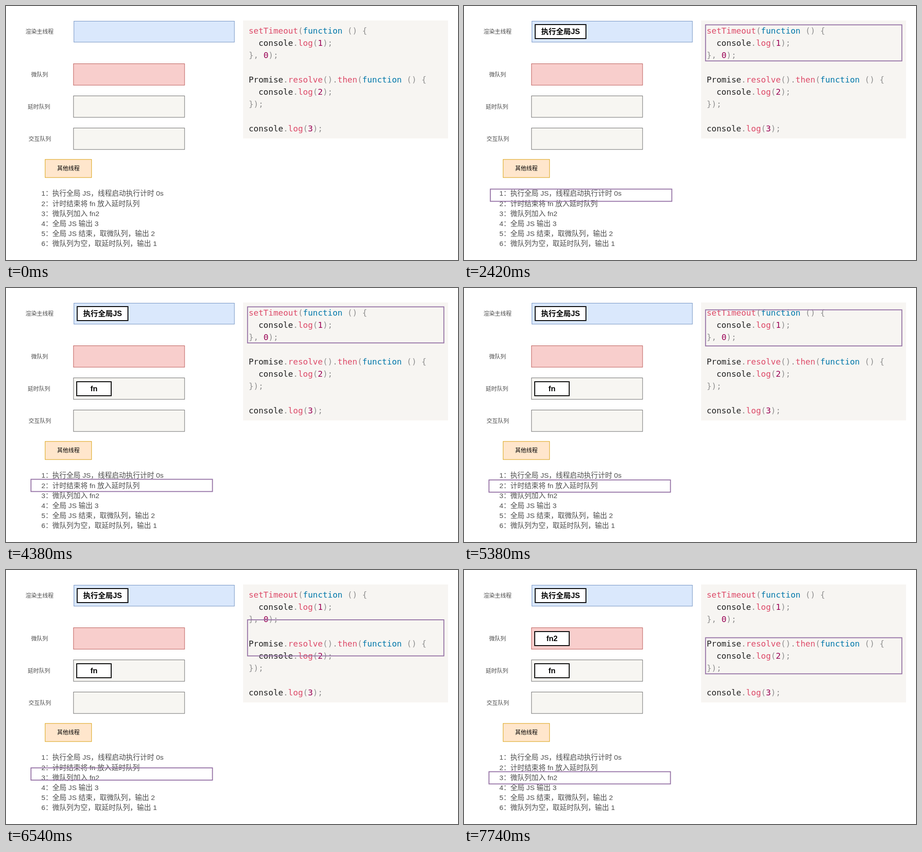
An HTML page that plays this animation: 997 px wide and 561 px high, repeating every 8 s.

```html
<!DOCTYPE html>
<html lang="zh-CN">
<head>
<meta charset="utf-8">
<title>Event loop</title>
<style>
  html, body { margin: 0; width: 100%; height: 100%; overflow: hidden; background: #fff; }
  svg { display: block; width: 997px; height: 561px; }
  text { font-family: "Liberation Sans", "Noto Sans CJK SC", "Noto Sans CJK", sans-serif; white-space: pre; }
  .label { font-size: 12.4px; fill: #4c4c4c; text-anchor: middle; }
  .step { font-size: 15.55px; fill: #4c4c4c; }
  .task { font-size: 16.4px; font-weight: bold; text-anchor: middle; }
  .code { font: 18.1px "DejaVu Sans Mono", monospace; fill: #222; }
  .call { fill: #dd4a68; }
  .key { fill: #0077aa; }
  .num { fill: #990055; }
  .punct { fill: #919191; }
</style>
</head>
<body>
<svg id="stage" viewBox="0 0 997 561"></svg>
<script>
const LOOP = 8000;
const stage = document.getElementById('stage');

const rect = (x, y, w, h, fill, stroke = 'none', width = 1, id = '') =>
  `<rect${id && ` id="${id}"`} x="${x}" y="${y}" width="${w}" height="${h}" fill="${fill}" stroke="${stroke}" stroke-width="${width}"/>`;
const text = (x, y, cls, body, fill = '') =>
  `<text x="${x}" y="${y}" class="${cls}"${fill && ` style="fill:${fill}"`}>${body}</text>`;
const queue = (y, fill, stroke) => rect(148.9, y, 245, 47.4, fill, stroke);
const task = (id, x, y, w, h, name) =>
  `<g id="${id}" opacity="0">${rect(x, y, w, h, '#fff', '#000', 2)}${text(x + w / 2, y + h / 2 + 5.7, 'task', name)}</g>`;
const marker = (id, w, h) => rect(0, 0, w, h, 'none', '#9673a6', 2, id);

const highlight = line => line.replace(
  /(\bfunction\b)|(\w+)(?=\()|(\b\d+\b)|([.(){},;]+)/g,
  (m, key, call, num) => `<tspan class="${key ? 'key' : call ? 'call' : num ? 'num' : 'punct'}">${m}</tspan>`);

const code = `setTimeout(function () {
  console.log(1);
}, 0);

Promise.resolve().then(function () {
  console.log(2);
});

console.log(3);`.split('\n');

const steps = [
  '执行全局 JS，线程启动执行计时 0s',
  '计时结束将 fn 放入延时队列',
  '微队列加入 fn2',
  '全局 JS 输出 3',
  '全局 JS 结束，取微队列，输出 2',
  '微队列为空，取延时队列，输出 1'
];

stage.innerHTML = [
  rect(149.8, 33.5, 354, 46.3, '#dae8fc', '#6c8ebf'),
  queue(127.5, '#f8cecc', '#b85450'),
  queue(198.5, '#f7f6f2', '#666'),
  queue(269.5, '#f7f6f2', '#666'),
  rect(86.3, 338.9, 102.4, 40, '#ffe6cc', '#d79b00'),
  text(74, 61, 'label', '渲染主线程'),
  text(74, 156, 'label', '微队列'),
  text(72.7, 227, 'label', '延时队列'),
  text(74.5, 298, 'label', '交互队列'),
  text(137.5, 363, 'label', '其他线程', '#000'),
  ...steps.map((s, i) => text(78, 419.3 + i * 22.2, 'step', `${i + 1}：${s}`)),
  rect(523, 32, 452, 260.5, '#f7f5f2'),
  ...code.map((line, i) => text(535.2, 61 + i * 27.05, 'code', highlight(line))),
  task('main', 157, 41, 112, 31, '执行全局JS'),
  task('micro', 156, 136, 76, 31, 'fn2'),
  task('delay', 156, 207, 76, 31, 'fn'),
  marker('codeBox', 433, 79.7),
  marker('stepBox', 400.3, 27)
].join('');

const el = id => document.getElementById(id);
const set = (id, attrs) => {
  for (const k in attrs) el(id).setAttribute(k, attrs[k]);
};

// cubic-bezier(.42, 0, .58, 1)
function easeInOut(p) {
  if (p <= 0) return 0;
  if (p >= 1) return 1;
  let lo = 0, hi = 1, u = 0.5;
  for (let i = 0; i < 24; i++) {
    u = (lo + hi) / 2;
    const x = 1.26 * (1 - u) * (1 - u) * u + 1.74 * (1 - u) * u * u + u * u * u;
    if (x < p) lo = u; else hi = u;
  }
  return u * u * (3 - 2 * u);
}

const ramp = (t, start, length) => easeInOut((t - start) / length);

function draw(t) {
  const shown = ramp(t, 480, 560);
  const first = ramp(t, 1500, 2880);
  const second = ramp(t, 4880, 2870);

  set('main', { opacity: shown });
  set('delay', { opacity: ramp(t, 3390, 880) });
  set('micro', { opacity: ramp(t, 6780, 880) });
  set('codeBox', { opacity: shown, x: 532.8, y: 41.6 + 108 * second });
  set('stepBox', {
    opacity: shown,
    x: 58.9 - 3.8 * first,
    y: 399.5 + 23 * first + 23 * second
  });
}

const begin = performance.now();
function tick() {
  draw((performance.now() - begin) % LOOP);
  requestAnimationFrame(tick);
}
draw(0);
requestAnimationFrame(tick);
</script>
</body>
</html>
```
